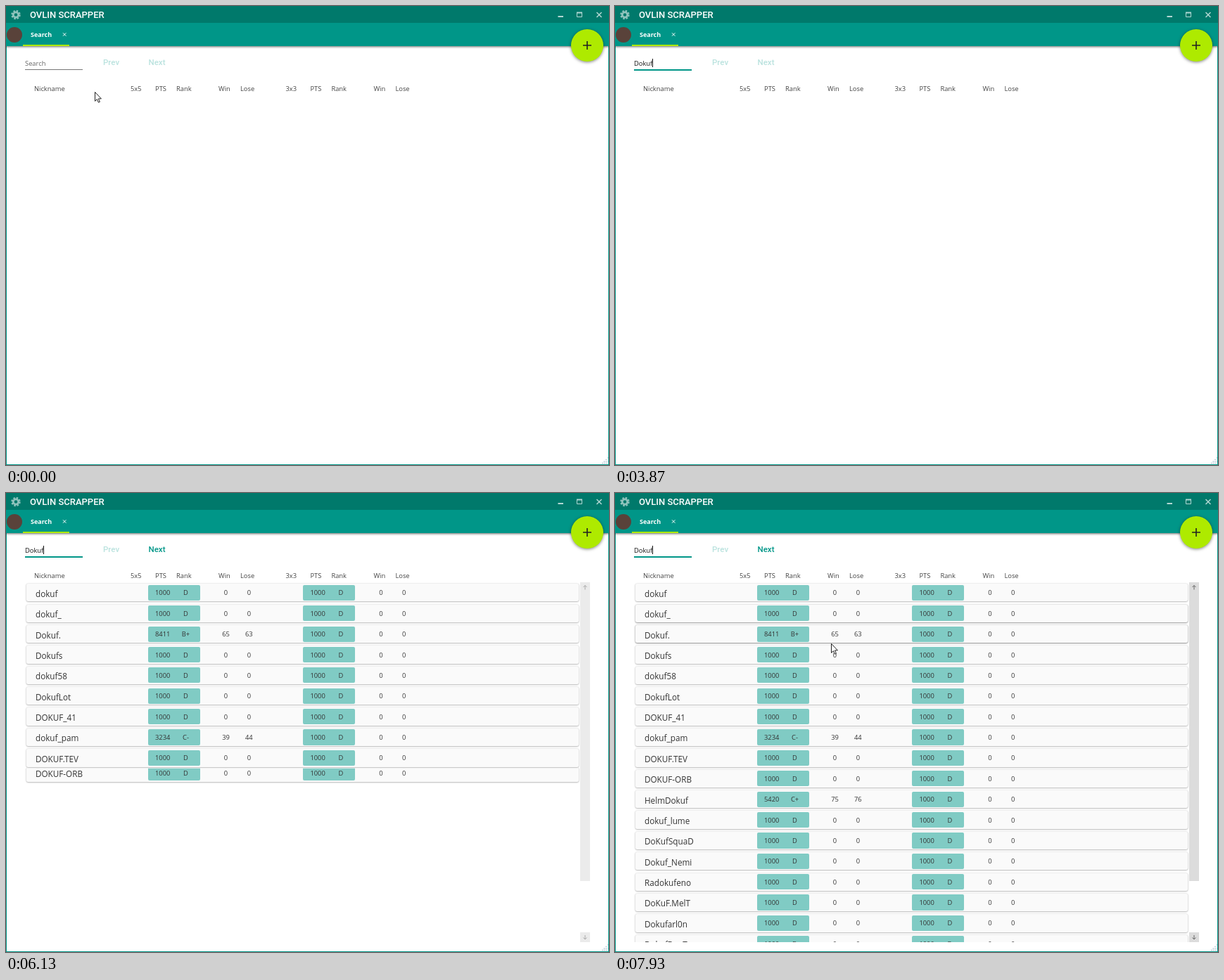
Animation, 857 px wide and 653 px high, one loop 8 s. Source, as an HTML page:

```html
<!DOCTYPE html>
<html lang="en">
<head>
<meta charset="utf-8">
<title>Player search</title>
<style>
  html, body { margin: 0; width: 100%; height: 100%; overflow: hidden; background: #fff; }
  #stage {
    position: relative; width: 857px; height: 653px; overflow: hidden; background: #fff;
    font: 9.35px/14px "Open Sans", "Noto Sans", sans-serif; color: #444;
  }
  #stage div, #stage span, #stage svg { position: absolute; }
  span { white-space: pre; transform: translateY(-50%); }
  .mid { transform: translate(-50%, -50%); }
  .frame { inset: 0; border: 1px solid #009688; border-top: 0; box-sizing: border-box; }
  .title { left: 0; top: 0; width: 857px; height: 24px; background: #00796b; }
  .tabs { left: 0; top: 24px; width: 857px; height: 33px; background: #009688; box-shadow: 0 1px 3px rgba(0,0,0,.6); }
  .name { font: 500 13px/16px Roboto, sans-serif; color: #fff; }
  .tab { font-weight: 700; font-size: 9px; color: #fff; }
  .mark { left: 1px; top: 30px; width: 22px; height: 22px; border-radius: 50%; background: #59423a; }
  .active { left: 24px; top: 55px; width: 66px; height: 2px; background: #aeea00; }
  .fab { left: 803px; top: 33px; width: 46px; height: 46px; border-radius: 50%; background: #aeea00; box-shadow: 0 1px 4px rgba(0,0,0,.5); }
  .btn { font: 500 11.5px/14px Roboto, sans-serif; color: #009688; }
  .off { opacity: .27; }
  .line { left: 27px; top: 90px; width: 82px; height: 1px; background: #777; }
  .focus { left: 27px; top: 90px; width: 82px; height: 2px; background: #009688; }
  .caret { top: 75px; width: 1px; height: 12px; background: #111; }
  .list { left: 20px; top: 127.4px; width: 815px; height: 511.6px; overflow: hidden; }
  .slot { left: 0; width: 815px; height: 29.38px; clip-path: inset(0 0 -4px 0); }
  .row { left: 0; top: 0; width: 815px; height: 29.38px; }
  .card { left: 9px; top: 1.8px; height: 25.3px; border-radius: 2px; background: #fafafa; }
  .chip { top: 3.4px; width: 74px; height: 22.2px; border-radius: 2px; background: #80cbc4; }
  .row span { top: 15px; color: #333; }
  .row .nick { font-size: 11.7px; top: 15.4px; }
  .bar { left: 816px; top: 127px; width: 14px; height: 512px; }
  .thumb { top: 0; width: 14px; height: 425px; background: #dcdcdc; }
  .down { top: 498px; width: 14px; height: 14px; background: #dcdcdc; }
</style>
</head>
<body>
<div id="stage">
  <div class="frame"></div>
  <div class="tabs"></div>
  <div class="title"></div>
  <div class="mark"></div>
  <div class="active"></div>
  <svg width="857" height="58" fill="none" stroke="#b2d7d3">
    <g stroke="#8fc3bc">
      <circle cx="14" cy="12.5" r="3.7" stroke-width="2.8"/>
      <circle cx="14" cy="12.5" r="5.6" stroke-width="2.2" stroke-dasharray="2.5 1.9"/>
    </g>
    <path d="M784.5 15h7.5" stroke-width="2"/>
    <path d="M811.5 9v6.5h7V9M811 9.5h8" />
    <path d="M811 9.5h8" stroke-width="2"/>
    <path d="M839.5 9l7 7m0-7l-7 7" stroke-width="1.5"/>
    <path d="M81 38.3l4.4 4.4m0-4.4l-4.4 4.4" stroke="#fff"/>
  </svg>
  <div class="fab"></div>
  <svg style="left:803px;top:33px" width="46" height="46" stroke="#222" stroke-width="1.6"><path d="M23 17v12M17 23h12"/></svg>
  <svg style="left:845px;top:642px" width="11" height="10" stroke="#a9bfce" stroke-width="1.4" stroke-dasharray="1.4 1.2">
    <path d="M2 8.5h8M4.6 6h6M7.2 3.4h3M9.8 .8h1"/>
  </svg>
  <div class="line" id="line"></div>
  <div class="focus" id="focus"></div>
  <div class="caret" id="caret"></div>
  <div class="list" id="list"></div>
  <div class="bar" id="bar">
    <div class="thumb"></div>
    <div class="down"></div>
    <svg width="14" height="512" fill="none" stroke="#666"><path d="M7 10.5v-6M4.5 7L7 4.5 9.5 7M7 502v6M4.5 505.500L7 508l2.500-2.500"/></svg>
  </div>
  <svg id="arrow" width="14" height="18" fill="#fff" stroke="#222"><path d="M.5.5v12.800l2.900-2.700 2 4.600 2-.9-2-4.400h4z"/></svg>
  <svg id="beam" width="7" height="18" fill="none" stroke="#333"><path d="M.5 .5h2l1 1 1-1h2M3.500 1.500v15M.5 17.500h2l1-1 1 1h2"/></svg>
</div>
<script>
const LOOP = 8000, PITCH = 29.38, SLIDE = 120;
const nicks = ['dokuf', 'dokuf_', 'Dokuf.', 'Dokufs', 'dokuf58', 'DokufLot', 'DOKUF_41', 'dokuf_pam',
  'DOKUF.TEV', 'DOKUF-ORB', 'HelmDokuf', 'dokuf_lume', 'DoKufSquaD', 'Dokuf_Nemi', 'Radokufeno',
  'DoKuF.MelT', 'Dokufarl0n', 'DokufBenT'];
const starts = [4800, 4984, 5115, 5220, 5410, 5525, 5655, 5795, 5935, 6074, 6220, 6370, 6520, 6674, 6870, 7065, 7210, 7310];
const scores = { 2: ['8411', 'B+', '65', '63'], 7: ['3234', 'C-', '39', '44'], 10: ['5420', 'C+', '75', '76'] };
const blank = ['1000', 'D', '0', '0'];
const query = 'Dokuf', keys = [1400, 1770, 2300, 2570, 2790];
// time, x, y of the pointer
const path = [[6600, 83, 92], [6850, 83, 93], [7080, 116, 84], [7330, 120, 87], [7530, 150, 108], [7900, 307, 214]];

const $ = id => document.getElementById(id);
const stage = $('stage');
const clamp = v => Math.min(1, Math.max(0, v));
const easeOut = u => 1 - (1 - u) * (1 - u);
const show = (el, on) => { el.style.visibility = on ? 'visible' : 'hidden'; };

function add(parent, tag, cls, x) {
  const el = document.createElement(tag);
  el.className = cls;
  if (x !== undefined) el.style.left = x + 'px';
  return parent.appendChild(el);
}
function label(parent, text, x, y, cls = '') {
  const el = add(parent, 'span', cls, x);
  el.textContent = text;
  if (y !== undefined) el.style.top = y + 'px';
  return el;
}

label(stage, 'OVLIN SCRAPPER', 34, 12.5, 'name');
label(stage, 'Search', 35, 41, 'tab');
label(stage, 'Prev', 138, 79.5, 'btn off');
const next = label(stage, 'Next', 202.5, 79.5, 'btn');
const field = label(stage, '', 27, 81.5);
label(stage, 'Nickname', 40, 118);
for (const [side, dx] of [['5x5', 0], ['3x3', 220.4]])
  [[side, 177], ['PTS', 212], ['Rank', 242], ['Win', 302], ['Lose', 333]]
    .forEach(([text, x]) => label(stage, text, x + dx, 118));

const rows = nicks.map((nick, i) => {
  const slot = add($('list'), 'div', 'slot');
  slot.style.top = i * PITCH + 'px';
  const row = add(slot, 'div', 'row'), card = add(row, 'div', 'card');
  label(row, nick, 22, undefined, 'nick');
  [scores[i] || blank, blank].forEach((values, side) => {
    const dx = side * 220.4 - 20;
    add(row, 'div', 'chip', 202 + dx);
    [222.7, 255.5, 312.5, 345.3].forEach((x, k) => label(row, values[k], x + dx, undefined, 'mid'));
  });
  return { slot, row, card };
});

// Caret x after each typed letter
const pen = document.createElement('canvas').getContext('2d');
pen.font = '9.35px "Open Sans", "Noto Sans", sans-serif';
const ends = [...query, ''].map((_, n) => 27 + Math.round(pen.measureText(query.slice(0, n)).width));

function pointer(t) {
  if (t < 70) return [126, 122];
  if (t < 270) return [104, 104];
  if (t < path[0][0]) return null;
  const k = path.findIndex(p => p[0] > t);
  if (k < 0) return path[path.length - 1].slice(1);
  const [a, b] = [path[k - 1], path[k]], u = (t - a[0]) / (b[0] - a[0]);
  return [1, 2].map(j => a[j] + (b[j] - a[j]) * u);
}

function caretOn(t) {
  if (t < 1400) return t >= 600 && t < 1120;
  if (t < 2790) return true;
  return Math.floor((t - 2790) / 512) % 2 === 0;
}

function render(t) {
  const typed = keys.filter(k => t >= k).length;
  field.textContent = typed ? query.slice(0, typed) : 'Search';
  field.style.color = typed ? '#111' : '#666';
  $('caret').style.left = ends[typed] + 'px';
  show($('caret'), caretOn(t));
  $('line').style.background = t < 270 ? '#777' : '#009688';
  $('focus').style.transform = `scaleX(${easeOut(clamp((t - 500) / 300))})`;
  next.classList.toggle('off', t < 4600);

  const at = pointer(t);
  show($('arrow'), at);
  if (at) $('arrow').style.transform = `translate(${at[0]}px, ${at[1]}px)`;
  show($('beam'), t >= 270 && t < 1400);
  $('beam').style.transform = t < 530 ? 'translate(94px, 80px)' : 'translate(80px, 75px)';

  const scrolls = t >= starts[4];
  show($('bar'), scrolls);
  $('bar').style.opacity = t < 7500 ? .56 : 1;
  rows.forEach(({ slot, row, card }, i) => {
    const p = easeOut(clamp((t - starts[i]) / SLIDE));
    show(slot, p > 0);
    row.style.transform = `translateY(${(p - 1) * PITCH}px)`;
    card.style.width = (scrolls ? 785 : 799) + 'px';
    // the shadow deepens under the pointer and fades after it leaves
    const d = at ? at[1] - 127.4 - i * PITCH : -1;
    const lift = d < 0 ? 0 : clamp((85 - d) / 35);
    card.style.boxShadow = `0 .6px 2px rgba(0,0,0,${.42 + .25 * lift})`;
  });
}

function tick() {
  render(performance.now() % LOOP);
  requestAnimationFrame(tick);
}
tick();
</script>
</body>
</html>
```
